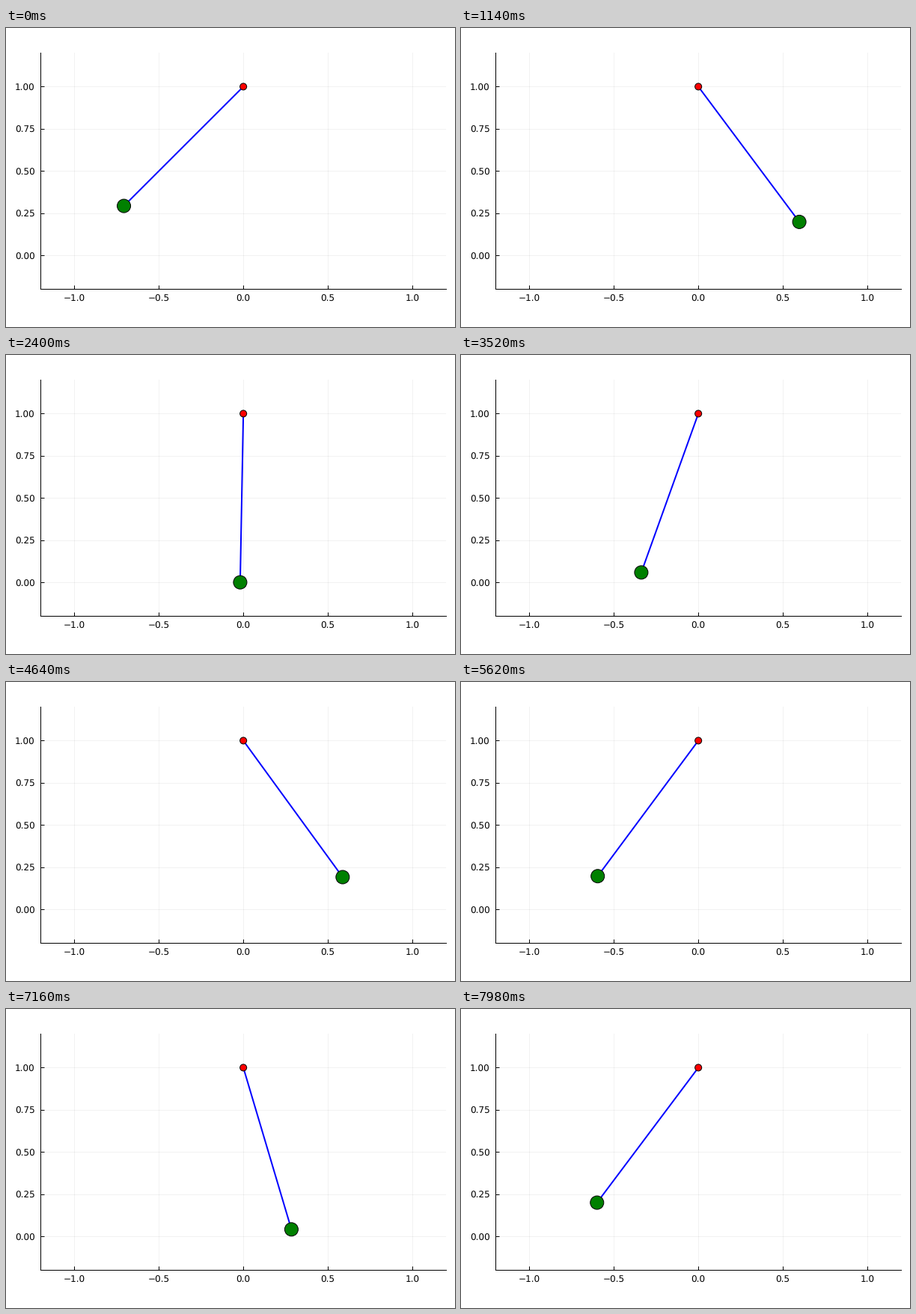
Recreate the animation shown at these times as a matplotlib script. Size 600x400 px, loop 8000 ms.

```python
import numpy as np
import matplotlib.pyplot as plt
from matplotlib.animation import FuncAnimation
from matplotlib.patches import Circle
from matplotlib.transforms import ScaledTranslation

W, H = 600, 400
LOOP, TICK = 8000, 20          # ms
G, LENGTH, DT = 9.81, 1.0, 0.05
START = -np.pi / 4

plt.rcParams.update({
    "font.family": "DejaVu Sans",
    "font.size": 12,
    "text.hinting": "no_hinting",
})


def step_at(ms):
    """Steps are held for 20, 100 and 20 ms in turn."""
    cycle, rest = divmod(ms, 140)
    return 3 * cycle + (rest >= 20) + (rest >= 120)


def slope(state):
    angle, speed = state
    return np.array([speed, -G / LENGTH * np.sin(angle)])


def swing(count, substeps=5):
    """Pendulum angles, one per step, by Runge-Kutta."""
    h = DT / substeps
    state = np.array([START, 0.0])
    angles = [START]
    for _ in range(count - 1):
        for _ in range(substeps):
            k1 = slope(state)
            k2 = slope(state + h / 2 * k1)
            k3 = slope(state + h / 2 * k2)
            k4 = slope(state + h * k3)
            state = state + h / 6 * (k1 + 2 * k2 + 2 * k3 + k4)
        angles.append(state[0])
    return np.array(angles)


angles = swing(step_at(LOOP - TICK) + 1)

# At 72 dpi one point is one pixel.
fig = plt.figure(figsize=(W / 72, H / 72), dpi=72, facecolor="white")
left, right, top, bottom = 46.3, 588.0, 33.3, 349.3
ax = fig.add_axes([left / W, 1 - bottom / H, (right - left) / W, (bottom - top) / H])
ax.set(xlim=(-1.2, 1.2), ylim=(-0.2, 1.2),
       xticks=np.arange(-1, 1.1, 0.5), yticks=np.arange(0, 1.1, 0.25))
ax.spines[["top", "right"]].set_visible(False)
ax.spines[["left", "bottom"]].set_linewidth(1)
ax.tick_params(direction="in", length=5, width=1)
ax.tick_params(axis="x", pad=7.5)
ax.tick_params(axis="y", pad=7.6)
ax.set_axisbelow(True)
ax.grid(color="black", alpha=0.05, linewidth=1)

nudge = ScaledTranslation(0, -0.8 / 72, fig.dpi_scale_trans)
for label in ax.get_yticklabels():
    label.set_transform(label.get_transform() + nudge)


def disc(x, y, color, radius):
    """Disc with its radius in pixels; circles move smoothly, markers snap."""
    scale = (right - left) / 2.4
    return ax.add_patch(Circle((x, y), radius / scale, facecolor=color, edgecolor="black",
                               linewidth=1, clip_on=False, zorder=4))


rod, = ax.plot([], [], color="blue", linewidth=2, zorder=3)
pivot = disc(0, LENGTH, "red", 4.5)
bob = disc(0, 0, "green", 9)


def draw(frame):
    angle = angles[step_at(frame * TICK)]
    x, y = LENGTH * np.sin(angle), LENGTH * (1 - np.cos(angle))
    rod.set_data([0, x], [LENGTH, y])
    bob.center = x, y
    return rod, bob


anim = FuncAnimation(fig, draw, frames=LOOP // TICK, interval=TICK,
                     init_func=lambda: draw(0), repeat=True, repeat_delay=0)
plt.show()
```
